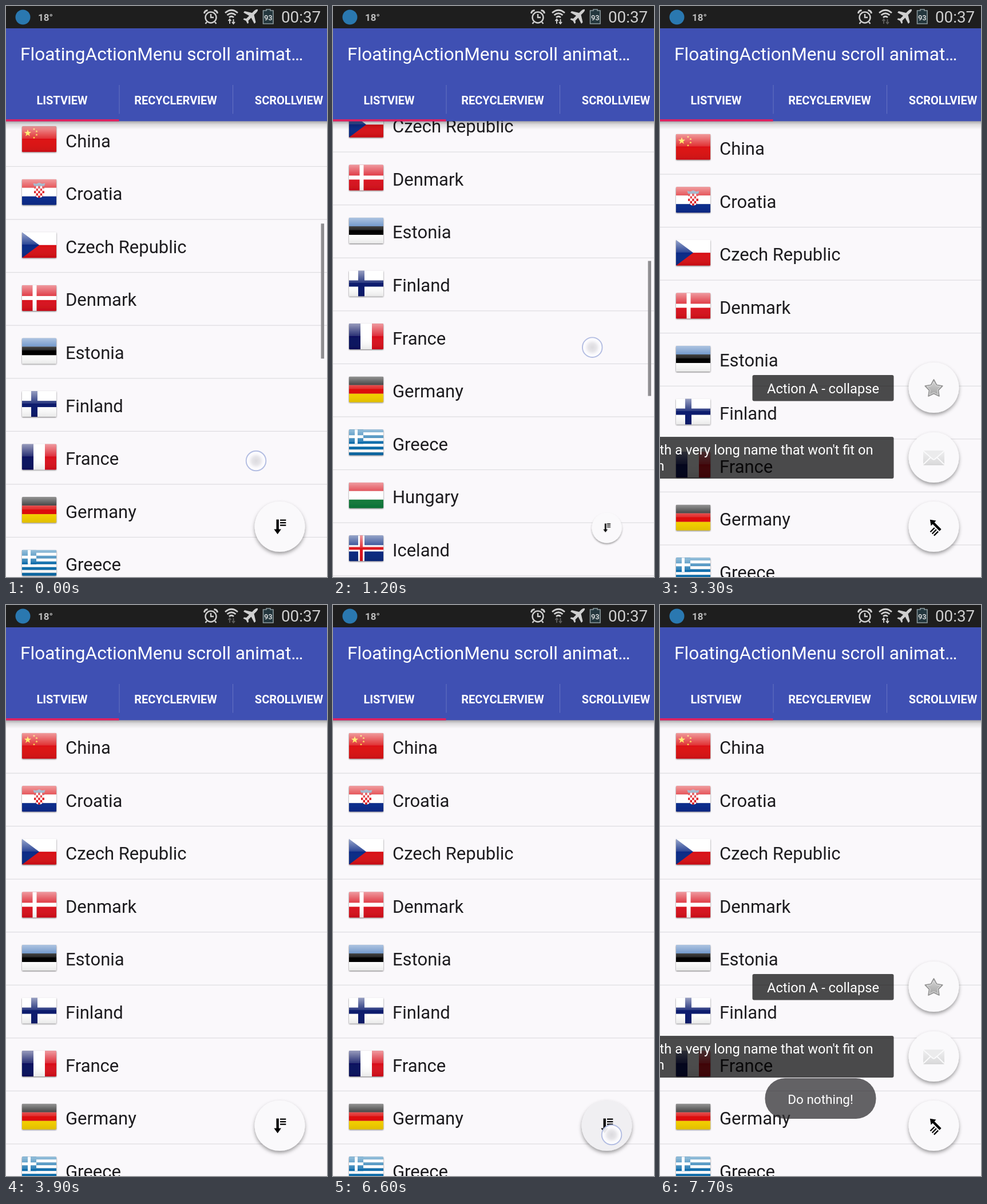
These frames come from a looping animation (561x998 px, 8 s). An HTML page:

```html
<!DOCTYPE html>
<html lang="en">
<head>
<meta charset="utf-8">
<title>Floating action menu</title>
<style>
  html, body { margin: 0; width: 100%; height: 100%; overflow: hidden; background: #faf8fb; }
  svg { display: block; width: 561px; height: 998px; font-family: Roboto, sans-serif; }
  .row { font-size: 31px; fill: #1d1c1f; }
  .tab { font-size: 20px; font-weight: 700; fill: #fff; text-anchor: middle; }
  .label { font-size: 23.7px; fill: #fff; }
</style>
</head>
<body>
<svg viewBox="0 0 561 998">
  <defs>
    <linearGradient id="gloss" x2="0" y2="1">
      <stop stop-color="#fff" stop-opacity=".58"/>
      <stop offset=".48" stop-color="#fff" stop-opacity=".14"/>
      <stop offset=".49" stop-color="#fff" stop-opacity="0"/>
      <stop offset="1" stop-color="#000" stop-opacity=".09"/>
    </linearGradient>
    <linearGradient id="barShadow" x2="0" y2="1">
      <stop stop-color="#000" stop-opacity=".34"/>
      <stop offset=".4" stop-color="#000" stop-opacity=".12"/>
      <stop offset="1" stop-color="#000" stop-opacity="0"/>
    </linearGradient>
    <linearGradient id="steel" x2="0" y2="1">
      <stop stop-color="#d6d6d6"/><stop offset="1" stop-color="#a2a2a2"/>
    </linearGradient>
    <linearGradient id="paper" x2="0" y2="1">
      <stop stop-color="#efeff0"/><stop offset="1" stop-color="#d9d9da"/>
    </linearGradient>
    <radialGradient id="finger">
      <stop stop-color="#d9d8dc"/><stop offset=".4" stop-color="#e4e3e7"/>
      <stop offset=".72" stop-color="#faf9fc"/><stop offset="1" stop-color="#fff"/>
    </radialGradient>
    <filter id="lift" x="-30%" y="-30%" width="160%" height="170%">
      <feDropShadow dx="0" dy="3.5" stdDeviation="3" flood-opacity=".38"/>
    </filter>
    <filter id="flat" x="-10%" y="-10%" width="120%" height="130%">
      <feDropShadow dx="0" dy="1" stdDeviation=".9" flood-opacity=".55"/>
    </filter>
    <clipPath id="flagShape"><rect width="60" height="45" rx="1.5"/></clipPath>
  </defs>

  <rect width="561" height="998" fill="#faf8fb"/>
  <g id="list"></g>
  <rect id="scrollbar" x="550.5" width="5.5" height="236" fill="#8f8e91"/>

  <g id="mail">
    <rect x="-60" y="-35.5" width="468.5" height="73" rx="3" fill-opacity=".7"/>
    <g class="label" text-anchor="end">
      <text x="372.5" y="-4.5">Action B with a very long name that won't fit on</text>
      <text x="7.5" y="23.5">the screen</text>
    </g>
    <circle cx="478.5" cy=".5" r="44" fill="#faf9fb" filter="url(#lift)"/>
    <g transform="translate(478.5 .5)">
      <rect x="-18.5" y="-12" width="37" height="25" rx="1" fill="url(#paper)"/>
      <path d="M-18.5 -12H18.5L2 3Q0 4.5 -2 3Z" fill="#ebebec"/>
      <path d="M-19 13L-5.5 0M19 13L5.5 0M-19 -12L-2 3Q0 4.5 2 3L19 -12" fill="none" stroke="#fafafb" stroke-width="2"/>
      <path d="M-18 13H18" stroke="#cbcbcc"/>
    </g>
  </g>

  <g id="star">
    <rect x="161.5" y="-22" width="247" height="45.5" rx="3" fill-opacity=".7"/>
    <text class="label" x="187" y="10">Action A - collapse</text>
    <circle cx="478.5" r="44" fill="#faf9fb" filter="url(#lift)"/>
    <g id="starIcon" transform="translate(478.5 2)"></g>
  </g>

  <g id="fab">
    <circle id="fabDisc" cx="478.5" cy="910" r="44" filter="url(#lift)"/>
    <g id="fabIcon">
      <path d="M-6 -12.5H-1.7V4.5H2.4L-3.9 13.3L-10.2 4.5H-6Z"/>
      <path d="M.5 -11.3H10.8M.5 -6.8H10.8M.5 -2.3H10.8" stroke="#000" stroke-width="2.3"/>
    </g>
  </g>

  <g id="toast">
    <rect x="183.5" y="827" width="194" height="71" rx="35" fill="#2c2b2e" fill-opacity=".73"/>
    <text x="280.5" y="872" font-size="22.5" fill="#fff" text-anchor="middle">Do nothing!</text>
  </g>

  <rect y="201" width="561" height="15" fill="url(#barShadow)"/>
  <rect y="39" width="561" height="162.3" fill="#3f50b3"/>
  <text x="25" y="95" font-size="31.6" fill="#fff">FloatingActionMenu scroll animat…</text>
  <path d="M198 138V188.5M396.5 138V188.5" stroke="#fff" stroke-opacity=".2"/>
  <text class="tab" x="98" y="171.5">LISTVIEW</text>
  <text class="tab" x="296.5" y="171.5">RECYCLERVIEW</text>
  <text class="tab" x="494.5" y="171.5">SCROLLVIEW</text>
  <rect y="198" width="197.5" height="3.6" fill="#e0205f"/>

  <rect width="561" height="39" fill="#1e1e1e"/>
  <circle cx="29.5" cy="19.5" r="13" fill="#2a78b0"/>
  <text x="56" y="26" font-size="17" font-weight="700" fill="#bdbdbd">18°</text>
  <g fill="none" stroke="#cfcfcf" stroke-width="2.4">
    <circle cx="358" cy="20" r="9.5"/>
    <path d="M358 14V20H363M351 28L348.5 31M365 28L367.5 31"/>
    <path d="M346.5 13Q347 8 352.5 7.5M369.5 13Q369 8 363.5 7.5" stroke-width="3"/>
    <path d="M383 12Q394 2.5 405 12M386.5 16Q394 9.5 401.5 16M390 20Q394 16.5 398 20" stroke-width="2.8"/>
    <path id="traffic" d="M391 31V23.5M388.5 26L391 23L393.5 26M397.5 23V30.5M395 28L397.5 31L400 28" stroke-width="1.9"/>
  </g>
  <path fill="#cfcfcf" d="M440 6Q437 5 433.5 8.5L430 12L417 9L415 11.5L425 17L420 22L416 21.5L414.5 23.5L419.5 26L422 31L424 29.5L423.5 25.5L428.5 20.5L434 31L436.5 28.5L433.5 15.5L437.5 11.5Q440.5 8.5 440 6Z"/>
  <path d="M455 8V6H462V8H467V31H449.5V8Z" fill="#23363d" stroke="#8b999d" stroke-width="1.6"/>
  <text x="458.3" y="24.5" font-size="13" font-weight="500" fill="#e8e8e8" text-anchor="middle">93</text>
  <text x="481" y="29" font-size="27.8" fill="#cfcfcf">00:37</text>

  <circle id="touch" r="17.3" fill="url(#finger)" fill-opacity=".92" stroke="#b3bde2" stroke-width="1.9"/>
</svg>

<script>
const LOOP = 8000, STEP = 100;
const ROW_TOP = 187.9, ROW_HEIGHT = 92.57;
const $ = id => document.getElementById(id);
const clamp = x => Math.min(1, Math.max(0, x));
const span = (t, from, to) => clamp((t - from) / (to - from));

// Flags, drawn on a 60 x 45 field
const box = (x, y, w, h, fill) => `<rect x="${x}" y="${y}" width="${w}" height="${h}" fill="${fill}"/>`;
const rows = (...colors) => colors.map((c, i) => box(0, i * 45 / colors.length, 60, 45 / colors.length, c)).join('');
const columns = (...colors) => colors.map((c, i) => box(i * 60 / colors.length, 0, 60 / colors.length, 45, c)).join('');
const cross = (x, y, size, color) => box(x - size / 2, 0, size, 45, color) + box(0, y - size / 2, 60, size, color);

function star(cx, cy, r, attrs, inner = 0.4) {
  const points = Array.from({ length: 10 }, (_, i) => {
    const a = i * Math.PI / 5 - Math.PI / 2, d = i % 2 ? r * inner : r;
    return `${(cx + d * Math.cos(a)).toFixed(2)},${(cy + d * Math.sin(a)).toFixed(2)}`;
  });
  return `<polygon points="${points.join(' ')}" ${attrs}/>`;
}

function croatia() {
  let shield = '';
  for (let r = 0; r < 5; r++)
    for (let c = 0; c < 5; c++)
      shield += box(21 + c * 3.6, 12 + r * 4.2, 3.6, 4.2, (r + c) % 2 ? '#fff' : '#dc1c22');
  return rows('#dc161c', '#fff', '#0a2a8c') +
    '<path d="M21 12L19.5 7L25 8L30 6L35 8L40.500 7L39 12Z" fill="#6f8fae"/>' +
    '<clipPath id="shield"><path d="M21 11H39V24Q38 31 30 33Q22 31 21 24Z"/></clipPath>' +
    `<g clip-path="url(#shield)">${shield}</g>`;
}

const yellow = 'fill="#ffe32e"';
const china = () => box(0, 0, 60, 45, '#dc1013') + star(10, 12, 6.5, yellow) +
  [[21, 5], [25.5, 9], [25.5, 15], [21, 20]].map(([x, y]) => star(x, y, 2.3, yellow)).join('');

const greece = () => rows(...Array.from({ length: 9 }, (_, i) => i % 2 ? '#fff' : '#0c6cab')) +
  box(0, 0, 25, 25, '#0c6cab') + box(10, 0, 5, 25, '#fff') + box(0, 10, 25, 5, '#fff');

const india = () => rows('#f08a3c', '#fff', '#12803c') +
  '<g fill="none" stroke="#20267c"><circle cx="30" cy="22.5" r="6"/>' +
  '<circle cx="30" cy="22.5" r="3" stroke-width="5" stroke-dasharray=".8 .8" opacity=".6"/></g>';

const countries = [
  ['China', china()],
  ['Croatia', croatia()],
  ['Czech Republic', rows('#fff', '#d90f16') + '<path d="M0 0L30 22.5L0 45Z" fill="#0b2a86"/>'],
  ['Denmark', box(0, 0, 60, 45, '#d90f1c') + cross(22, 22.5, 7, '#fff')],
  ['Estonia', rows('#3f73b8', '#000', '#fff')],
  ['Finland', box(0, 0, 60, 45, '#fff') + cross(21.5, 22.5, 11, '#07196c')],
  ['France', columns('#07105f', '#fff', '#d90f1c')],
  ['Germany', rows('#000', '#dc0a0a', '#f5cf00')],
  ['Greece', greece()],
  ['Hungary', rows('#d9141f', '#fff', '#0e7a3a')],
  ['Iceland', box(0, 0, 60, 45, '#06287f') + cross(21.5, 22.5, 11, '#fff') + cross(21.5, 22.5, 5, '#dc141c')],
  ['India', india()],
  ['Indonesia', rows('#d9141f', '#fff')],
];

$('list').innerHTML = countries.map(([name, flag], i) => `
  <g transform="translate(0 ${(ROW_TOP + i * ROW_HEIGHT).toFixed(2)})">
    <g transform="translate(28 22.3)" filter="url(#flat)"><g clip-path="url(#flagShape)">
      ${flag}<rect width="60" height="45" fill="url(#gloss)"/></g></g>
    <text class="row" x="104" y="58.8">${name}</text>
    <rect y="92" width="561" height="1.2" fill="#dddce0"/>
  </g>`).join('');

$('starIcon').innerHTML = star(0, 0, 16, 'fill="url(#steel)" stroke="#949494" stroke-width="1.8" stroke-linejoin="round"', 0.52) +
  star(0, 0, 13, 'fill="none" stroke="#e2e2e2" stroke-width="1"', 0.52);

// Interaction script
const toggles = [[-1000, false], [2015, true], [3610, false], [4815, true], [5610, false], [6615, true]];
const taps = [
  [1870, 2050, 485, 921], [3480, 3620, 482, 917], [4750, 4850, 485, 921],
  [5480, 5620, 484, 668], [6530, 6640, 487, 926], [7180, 7310, 478, 790],
];
const trafficOn = [[0, 1500], [2400, 3300], [7300, 8000]];

const sine = k => (1 - Math.cos(Math.PI * k)) / 2;
const overshoot = k => 1 + (k - 1) ** 2 * (3 * (k - 1) + 2);

const scrollAt = t => t < 900 ? 353 * sine(t / 900) : 353 - 366.5 * sine(span(t, 900, 1600));

function menuAt(t) {
  const [start, open] = toggles.filter(([at]) => at <= t).pop();
  const k = span(t, start, start + 300);
  if (open) return { lift: overshoot(k), alpha: 1 - (1 - k) ** 2, turn: 135 * overshoot(k) };
  const left = (1 - k) ** 6;
  return { lift: left, alpha: left, turn: 135 * (1 - overshoot(k)) };
}

function touchAt(t, scroll) {
  if (t < 1550) return { x: 437 + scroll * 0.077, y: 795 - scroll * 0.942 };
  const tap = taps.find(([from, to]) => t >= from && t < to);
  return tap && { x: tap[2], y: tap[3], pressed: tap[3] > 866 && t - tap[0] > 60 };
}

function set(id, attrs) {
  for (const name in attrs) $(id).setAttribute(name, attrs[name]);
}

function render(t) {
  const scroll = scrollAt(t), menu = menuAt(t), touch = touchAt(t, scroll);
  const scale = t < 1000 ? 1 - span(t, 480, 710) : span(t, 1050, 1300);

  set('list', { transform: `translate(0 ${-scroll})` });
  set('scrollbar', { y: 380.3 + scroll * 0.31, opacity: 1 - span(t, 1900, 2150) });
  set('star', { transform: `translate(0 ${910 - 243 * menu.lift})`, opacity: menu.alpha });
  set('mail', { transform: `translate(0 ${910 - 121.5 * menu.lift})`, opacity: menu.alpha });
  set('fab', {
    transform: `translate(478.5 915) scale(${scale}) translate(-478.5 -915)`,
    visibility: scale ? 'visible' : 'hidden',
  });
  set('fabIcon', { transform: `translate(478.5 910) rotate(${menu.turn})` });
  set('fabDisc', { fill: touch && touch.pressed ? '#f0eff2' : '#faf9fb' });
  set('toast', { opacity: 1 - (1 - span(t, 7310, 7700)) ** 2 });
  set('traffic', { stroke: trafficOn.some(([a, b]) => t >= a && t < b) ? '#cfcfcf' : '#5c5c5c' });
  set('touch', touch ? { cx: touch.x, cy: touch.y, visibility: 'visible' } : { visibility: 'hidden' });
}

const began = performance.now();
function tick() {
  const t = (performance.now() - began) % LOOP;
  render(Math.floor(t / STEP) * STEP);
  requestAnimationFrame(tick);
}
tick();
</script>
</body>
</html>
```
